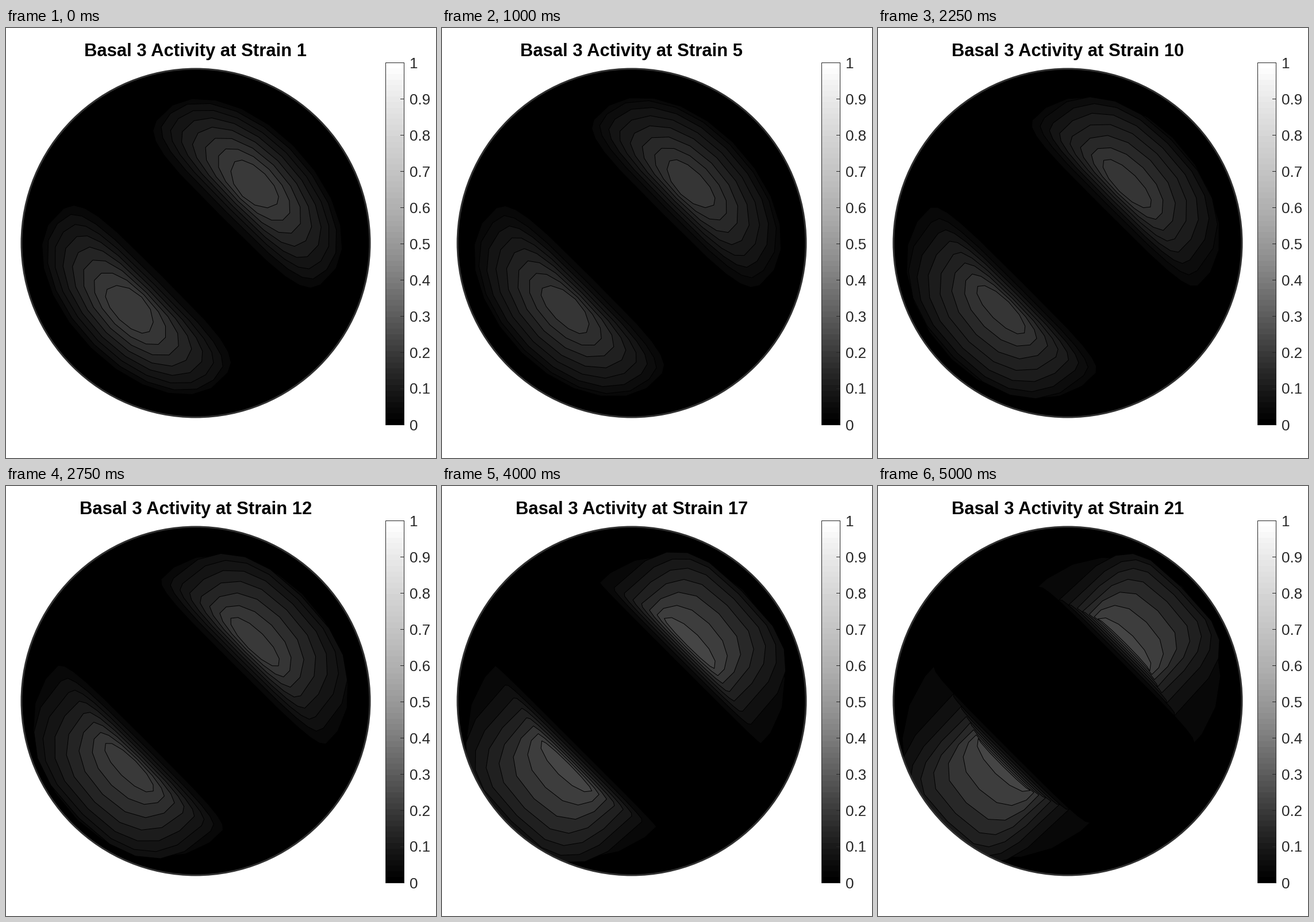
Recreate the animation shown at these times as a matplotlib script. Size 748x748 px, loop 5250 ms.

```python
import numpy as np
import matplotlib.pyplot as plt
from matplotlib.animation import FuncAnimation
from matplotlib.patches import Circle, Polygon, Rectangle

SIZE, DPI = 748, 100
FRAMES, INTERVAL = 21, 250
LEVELS = 8
CX, CY, R = 330, 374, 303
LEFT, RIGHT, TOP, BOTTOM = 660, 692, 60, 690
PX = 72 / DPI
DARK = "#262626"
FONT = "Liberation Sans"


def mix(a, b, k):
    return a + (b - a) * k


def outline(x, t, side):
    """Contour of a lobe: x runs from its rim (0) to its peak (1)."""
    far = side < 0
    # Extents along the lobe's axis, half width, and where it is widest.
    inner = mix(64 + 50 * t, 115 + 27 * t, x**0.75)
    outer = mix(240 + 42 * t + 20 * t * far, 170 - 10 * t, x**(1.1 + t))
    width = mix(200 - 22 * t**2, 52 + 12 * t, x**(1.4 - 0.9 * t**2))
    middle = mix(125 - 27 * t**2, 148 - 10 * t**2, x**(1 - 0.5 * t))

    # Superellipse halves; the outer one turns boxy late in the loop.
    corners = 12 + 2 * round(5 * (1 - x))
    s = np.linspace(0, 2 * np.pi, corners, endpoint=False)
    c, v = np.cos(s), np.sin(s)
    boxy = 2 + 2 * t**2 * np.sin(np.pi * x**0.6)
    power = np.where(c > 0, 2 / boxy, 2 / (4 - 2 * x))
    reach = np.where(c > 0, outer, inner) - middle
    u = middle + reach * np.abs(c)**power + 18 * far
    v = width * np.sign(v) * np.abs(v)**power
    v = np.where(v < 0, v * (1 + (0.03 + 0.14 * t) * (1 - x)**3), v)

    dx, dy = (u - v) / 2**0.5, (u + v) / 2**0.5
    return np.column_stack([CX + side * dx, CY - side * dy])


def gray(value):
    return str(round(63 * value) / 63)


def peak_value(t):
    return 0.235 - 0.035 * np.cos(5 * (t - 0.27))


fig = plt.figure(figsize=(SIZE / DPI, SIZE / DPI), dpi=DPI, facecolor="white")
ax = fig.add_axes([0, 0, 1, 1])
ax.axis("off")

disc = ax.add_patch(Circle((CX, CY), R, fc="black", ec="none", zorder=1))
ax.add_patch(Circle((CX, CY), R, fc="none", ec="#303030", lw=3 * PX, zorder=5))

lobes = []
for side in (1, -1):
    for level in range(1, LEVELS + 1):
        patch = Polygon([(0, 0)] * 3, ec="black", lw=PX, zorder=2 + level / 10)
        ax.add_patch(patch)
        patch.set_clip_path(disc)
        lobes.append((side, level, patch))

# Colour bar, slightly lifted in its middle tones
ramp = np.linspace(0, 1, 64)[:, None]
ax.imshow(ramp + 0.1 * np.sin(np.pi * ramp)**2, cmap="gray", vmin=0, vmax=1,
          origin="lower", extent=(LEFT, RIGHT, BOTTOM, TOP), aspect="auto",
          interpolation="nearest")
ax.set_xlim(0, SIZE)
ax.set_ylim(SIZE, 0)
ax.add_patch(Rectangle((LEFT, TOP), RIGHT - LEFT, BOTTOM - TOP,
                       fc="none", ec=DARK, lw=PX, zorder=6))
for n in range(11):
    y = mix(BOTTOM, TOP, n / 10)
    ax.plot([RIGHT - 6, RIGHT], [y, y], color=DARK, lw=PX, zorder=6)
    ax.text(702, y + 9.5, f"{n / 10:g}", family=FONT, size=26 * PX,
            color=DARK, ha="left", va="baseline")

title = ax.text(CX, 49, "", family=FONT, weight="bold", size=31 * PX,
                color="black", ha="center", va="baseline")


def update(i):
    t = i / (FRAMES - 1)
    for side, level, patch in lobes:
        patch.set_xy(outline((level - 1) / (LEVELS - 1), t, side))
        patch.set_facecolor(gray(peak_value(t) * level / LEVELS))
    title.set_text(f"Basal 3 Activity at Strain {i + 1}")
    return [patch for _, _, patch in lobes] + [title]


anim = FuncAnimation(fig, update, frames=FRAMES, interval=INTERVAL,
                     repeat=True, repeat_delay=0, blit=False)
plt.show()
```
